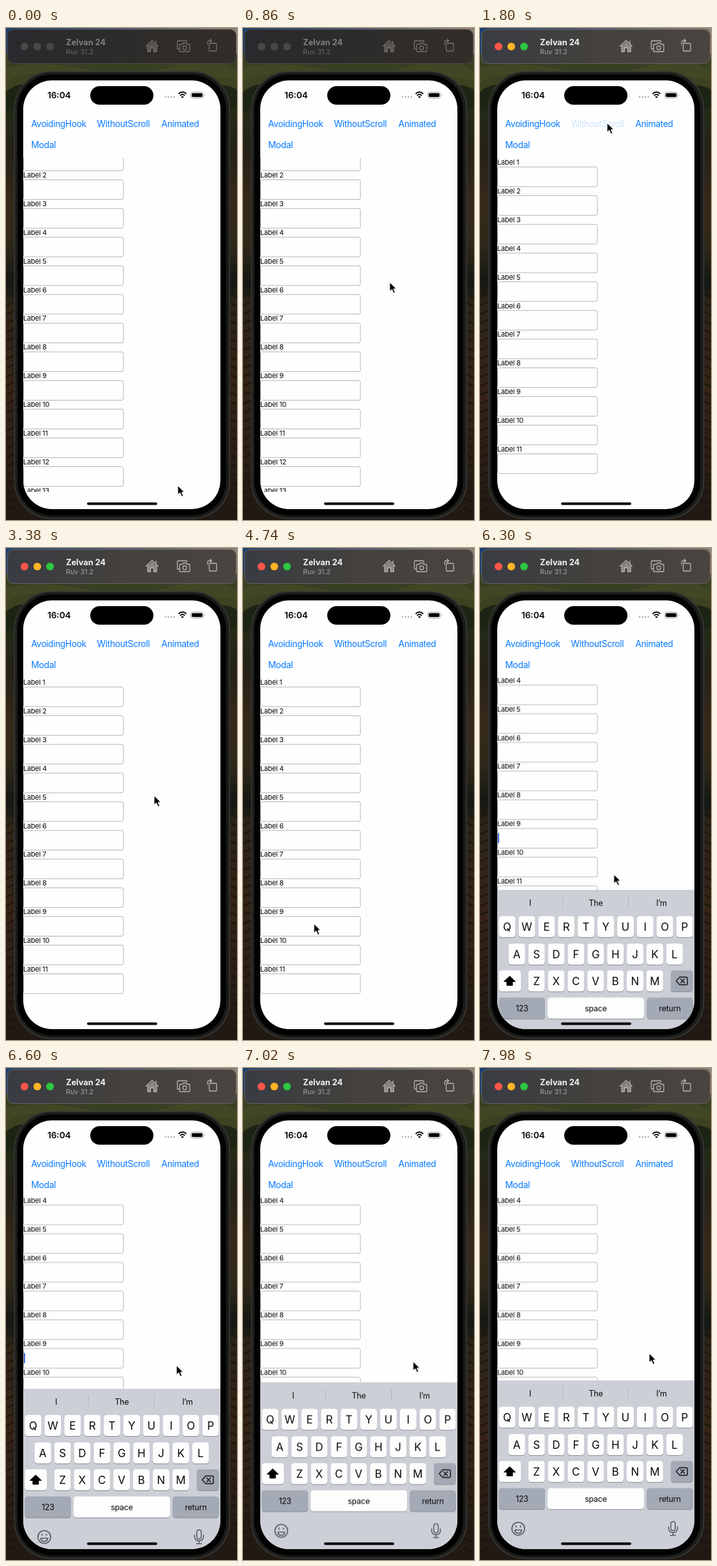
Animation, 362 px wide and 770 px high, one loop 8000 ms. Source, as an HTML page:

```html
<!DOCTYPE html>
<html lang="en">
<head>
<meta charset="utf-8">
<title>Keyboard avoiding demo</title>
<style>
html, body { margin: 0; width: 100%; height: 100%; overflow: hidden; background: #1c1a16; }
svg { display: block; width: 100vw; height: 100vh; }
text { font-family: Inter, Roboto, sans-serif; }
.tab { font-size: 13.8px; letter-spacing: -.025em; fill: #087aff; }
.label { font-size: 11px; letter-spacing: -.02em; fill: #080808; }
.field { fill: none; stroke: #b4b4b6; }
.key { fill: #fdfdfe; }
.key.alt { fill: #a3a9b5; }
.letter { font-size: 17px; }
.small { font-size: 12.5px; letter-spacing: -.02em; }
.letter, .small { fill: #080808; text-anchor: middle; }
.line { fill: none; stroke-linecap: round; stroke-linejoin: round; }

.idle, .awake, .first, .second, .shift, .caret { animation: 8s step-end infinite; }
.idle { animation-name: until-active; }
.awake { animation-name: from-active; }
.first { animation-name: until-switch; }
.second { animation-name: from-switch; }
.shift { animation-name: avoid; }
.caret { animation-name: blink; }
.press { animation: press 8s linear infinite; }
.keyboard { animation: rise 8s linear infinite; }
.pointer { animation: move 8s ease-in-out infinite; }

@keyframes until-active { 0% { opacity: 1 } 12.5%, 100% { opacity: 0 } }
@keyframes from-active { 0% { opacity: 0 } 12.5%, 100% { opacity: 1 } }
@keyframes until-switch { 0% { opacity: 1 } 22%, 100% { opacity: 0 } }
@keyframes from-switch { 0% { opacity: 0 } 22%, 100% { opacity: 1 } }
@keyframes avoid {
  0% { transform: translateY(0) }
  73%, 100% { transform: translateY(-137.7px) }
}
@keyframes blink {
  0% { opacity: 0 } 73% { opacity: 1 } 83.75% { opacity: 0 }
  90% { opacity: 1 } 96.25%, 100% { opacity: 0 }
}
@keyframes press {
  0%, 20.5% { opacity: 1 } 21%, 22.6% { opacity: .2 } 25.7%, 100% { opacity: 1 }
}
@keyframes rise {
  0%, 73% { transform: translateY(266px); animation-timing-function: cubic-bezier(.2, .3, .4, .98) }
  82.5% { transform: translateY(13px); animation-timing-function: ease-out }
  92%, 100% { transform: translateY(0) }
}
@keyframes move {
  0%, 3% { transform: translate(269px, 715.5px) }
  17.5%, 28.75% { transform: translate(199px, 148px) }
  40.6%, 42.5% { transform: translate(232px, 387px) }
  55%, 68% { transform: translate(111px, 587.5px) }
  71.25%, 74.4% { transform: translate(108px, 590px) }
  81.9%, 83.75% { transform: translate(267px, 465px) }
  93.75%, 100% { transform: translate(265px, 446px) }
}
</style>
</head>
<body>
<svg viewBox="0 0 362 770">
  <defs>
    <linearGradient id="land" x2="0" y2="1">
      <stop offset="0" stop-color="#2c3a28"/>
      <stop offset=".09" stop-color="#3a4122"/>
      <stop offset=".13" stop-color="#40401f"/>
      <stop offset=".17" stop-color="#232b17"/>
      <stop offset=".25" stop-color="#252116"/>
      <stop offset=".35" stop-color="#35281a"/>
      <stop offset=".44" stop-color="#2f2819"/>
      <stop offset=".52" stop-color="#131613"/>
      <stop offset=".56" stop-color="#2d2416"/>
      <stop offset=".75" stop-color="#352216"/>
      <stop offset="1" stop-color="#201913"/>
    </linearGradient>
    <linearGradient id="sky"><stop offset="0" stop-color="#1d3f73"/><stop offset=".5" stop-color="#4d5f77"/><stop offset="1" stop-color="#8d8178"/></linearGradient>
    <linearGradient id="awakeBar"><stop offset="0" stop-color="#393c43"/><stop offset=".4" stop-color="#42403e"/><stop offset="1" stop-color="#4a443f"/></linearGradient>
    <linearGradient id="idleBar"><stop offset="0" stop-color="#282a2d"/><stop offset="1" stop-color="#322d28"/></linearGradient>
    <clipPath id="screen"><rect x="27" y="82" width="309" height="671" rx="45"/></clipPath>
    <clipPath id="viewport"><rect x="26" y="203" width="310" height="523"/></clipPath>
  </defs>

  <rect width="362" height="770" fill="url(#land)"/>
  <rect width="362" height="40" fill="url(#sky)"/>
  <path d="M0 62Q60 50 130 66T260 60T362 68V82Q300 70 240 76T90 74T0 92Z" fill="#464c26" opacity=".6"/>
  <path d="M0 100Q12 88 40 86V120L0 132ZM362 96Q345 88 330 90V135L362 124Z" fill="#1c2414"/>
  <path id="rows" class="line" stroke="#171510" stroke-width="2"/>

  <g class="idle"><rect x="2.5" y="2.5" width="358" height="53" rx="9" fill="url(#idleBar)" stroke="#4a4743"/></g>
  <g class="awake"><rect x="2.5" y="2.5" width="358" height="53" rx="9" fill="url(#awakeBar)" stroke="#65625f"/></g>

  <rect x="13.5" y="68.5" width="337" height="699" rx="58" fill="#1b1b19" stroke="#353532" stroke-width="2"/>
  <rect x="18" y="73" width="327" height="690" rx="54" fill="#020202"/>
  <rect x="27" y="82" width="309" height="671" rx="45" fill="#fefefe"/>

  <g clip-path="url(#screen)">
    <text x="65" y="110" font-size="13.5" font-weight="600">16:04</text>
    <rect x="132" y="91" width="99" height="29" rx="14.5"/>
    <g fill="#b9b9bb"><circle cx="250" cy="108" r="1.4"/><circle cx="254.6" cy="108" r="1.4"/><circle cx="259.2" cy="108" r="1.4"/><circle cx="263.8" cy="108" r="1.4"/></g>
    <path d="M270.5 103Q276.5 97.5 282.5 103M272.8 105.7Q276.5 102.3 280.2 105.7" fill="none" stroke="#000" stroke-width="2"/>
    <path d="M274.3 107.5Q276.5 105.8 278.7 107.5L276.5 110Z"/>
    <rect x="289.5" y="100.5" width="20" height="9" rx="3" fill="none" stroke="#999"/>
    <rect x="291" y="102" width="17" height="6" rx="1.8"/>
    <path d="M311 103.5Q312.8 105 311 106.5Z" fill="#999"/>

    <text class="tab" x="39.5" y="155">AvoidingHook</text>
    <text class="tab press" x="142.5" y="155">WithoutScroll</text>
    <text class="tab" x="243.5" y="155">Animated</text>
    <text class="tab" x="39.5" y="188">Modal</text>

    <g clip-path="url(#viewport)">
      <g class="first"><g id="scrolled" transform="translate(0 -24.9)"></g></g>
      <g class="second"><g class="shift" id="plain"></g></g>
      <rect class="caret" x="28" y="446" width="2" height="16" rx="1" fill="#3f64e6"/>
    </g>

    <g class="keyboard" id="keyboard">
      <rect x="27" y="489" width="309" height="290" fill="#cccfd6"/>
      <path d="M129.500 499V517M232.500 499V517" stroke="#b3b6bd"/>
    </g>
    <rect x="127" y="742.5" width="110" height="4" rx="2"/>
  </g>

  <g class="pointer">
    <path d="M0 0V15.5L3.6 12.2L6.2 18L9 16.8L6.5 11.2H11.3Z" fill="#040404" stroke="#fff" stroke-width="1.2" stroke-linejoin="round"/>
  </g>
</svg>
<script>
const SVG = 'http://www.w3.org/2000/svg';
const byId = id => document.getElementById(id);

function add(parent, tag, attrs, content = '') {
  const node = document.createElementNS(SVG, tag);
  for (const name in attrs) node.setAttribute(name, attrs[name]);
  node.textContent = content;
  parent.append(node);
  return node;
}

function buildList(parent, count) {
  for (let i = 0; i < count; i++) {
    const y = 44.9 * i;
    add(parent, 'text', { class: 'label', x: 27, y: 214 + y }, `Label ${i + 1}`);
    add(parent, 'rect', { class: 'field', x: 27.5, y: 217.5 + y, width: 156.5, height: 30.8, rx: 3 });
  }
}

function buildTitleBar(group, lights, main, sub, icon) {
  lights.forEach((fill, i) => add(group, 'circle', { cx: 29 + 20 * i, cy: 29, r: 6, fill }));
  add(group, 'text', { x: 94, y: 27, 'font-size': 12.8, 'font-weight': 700, fill: main }, 'Zelvan 24');
  add(group, 'text', { x: 94, y: 41, 'font-size': 10.8, fill: sub }, 'Ruv 31.2');
  add(group, 'path', { d: 'M222 28L229 21.5L236 28V37H231.5V31H226.5V37H222Z', fill: icon, opacity: .6 });
  const icons = [
    'M219.5 28.5L229 19.5L238.5 28.5M222 27V37H226.5V31H231.5V37H236V27M235 24V20.5',
    'M271.5 33H269.5Q268.5 33 268.5 32V21.5Q268.5 20 270 20H282Q283.5 20 283.5 21.5V22M273 25.5H276.5L278 23.5H282L283.5 25.5H287Q288 25.5 288 26.5V36Q288 37 287 37H273Q272 37 272 36V26.5Q272 25.5 273 25.5ZM283 31A3 3 0 1 1 277 31A3 3 0 1 1 283 31',
    'M319.5 24H329Q330 24 330 25V35Q330 36 329 36H319.5Q318.5 36 318.5 35V25Q318.5 24 319.5 24ZM316 26V22Q316 20 318 20H322M320 17.5L322.5 20L320 22.5'
  ];
  for (const d of icons) add(group, 'path', { class: 'line', d, stroke: icon, 'stroke-width': 1.3 });
}

function key(x, y, width, label, type = 'letter', alt = '') {
  const board = byId('keyboard');
  add(board, 'rect', { x, y: y + 1, width, height: 33, rx: 4.5, fill: '#898c91' });
  add(board, 'rect', { class: `key ${alt}`, x, y, width, height: 33, rx: 4.5 });
  const baseline = y + (type === 'letter' ? 23 : 21);
  add(board, 'text', { class: type, x: x + width / 2, y: baseline }, label);
}

function buildKeyboard() {
  const board = byId('keyboard');
  ['I', 'The', 'I’m'].forEach((word, i) =>
    add(board, 'text', { class: 'small', x: 78.5 + 103 * i, y: 513.5 }, word));

  const rows = [['QWERTYUIOP', 29.5, 530], ['ASDFGHJKL', 44.7, 573], ['ZXCVBNM', 75.5, 615]];
  for (const [letters, x, y] of rows)
    [...letters].forEach((letter, i) => key(x + 30.9 * i, y, 26, letter));

  key(29.5, 615, 34.5, '');
  key(299, 615, 34.5, '', 'letter', 'alt');
  key(29.5, 657.5, 72.5, '123', 'small', 'alt');
  key(106, 657.5, 151, 'space', 'small');
  key(261.5, 657.5, 72, 'return', 'small', 'alt');

  add(board, 'path', { d: 'M46.5 624L55.5 632.5H51V638.5H42V632.5H37.5Z', stroke: '#000', 'stroke-linejoin': 'round' });
  const line = (d, stroke, width) =>
    add(board, 'path', { class: 'line', d, stroke, 'stroke-width': width });
  line('M307.5 631.5L313 625.5H323Q325 625.5 325 627.5V635.5Q325 637.5 323 637.5H313ZM314.5 628.5L320.5 634.5M320.5 628.5L314.5 634.5', '#111', 1.4);
  line('M70 721A10 10 0 1 1 50 721A10 10 0 1 1 70 721M54.5 723H65.5Q64.5 728 60 728T54.5 723ZM56.5 716.5V718.5M63.5 716.5V718.5', '#55585e', 1.6);
  line('M302.5 710Q306 710 306 713.5V720.5Q306 724 302.5 724T299 720.5V713.5Q299 710 302.5 710ZM295.5 718V720Q295.5 727 302.5 727T309.5 720V718M302.5 727V731.5M298.5 731.5H306.5', '#55585e', 1.5);
}

const furrows = Array.from({ length: 25 }, (_, i) => `M0 ${420 + i * 14}L15 ${414 + i * 14}M347 ${415 + i * 14}L362 ${421 + i * 14}`);
byId('rows').setAttribute('d', furrows.join(''));
buildTitleBar(document.querySelector('.idle'), Array(3).fill('#4a4845'), '#83807c', '#6b6966', '#74716d');
buildTitleBar(document.querySelector('.awake'), ['#ff5549', '#ffb524', '#2bc840'], '#f6f5f4', '#a6a4a2', '#b8b6b4');
buildList(byId('scrolled'), 13);
buildList(byId('plain'), 11);
buildKeyboard();
</script>
</body>
</html>
```
